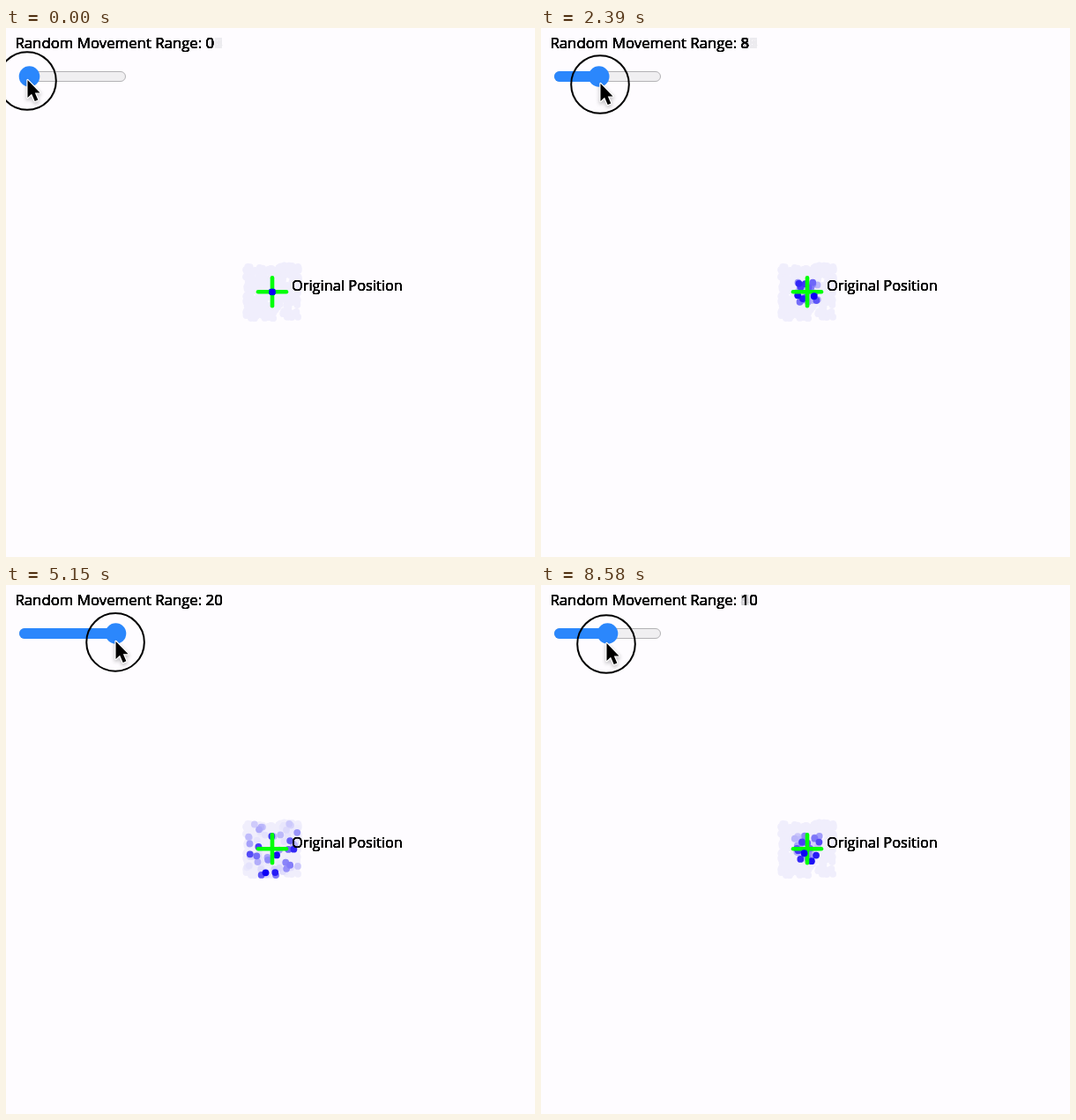
Animation of 600x600 px, one loop 8.61 s. Source, as an HTML page with a canvas:

```html
<!DOCTYPE html>
<html>
<head>
<meta charset="utf-8">
<style>
html, body { margin: 0; width: 100%; height: 100%; overflow: hidden; background: #fefcff; }
canvas { display: block; }
</style>
</head>
<body>
<canvas id="stage" width="600" height="600"></canvas>
<script>
const ctx = document.getElementById('stage').getContext('2d');
const LOOP = 8610, FRAME = 30, STEP = 15, TRAIL = 70, FADE = 0.94;
const CX = 302, CY = 299.3, MAX = 20, UNIT = 1.5;
const STAIN = [240, 238, 252], BLUE = [12, 0, 245];
const TEXT_STAIN = [236, 235, 239], BLACK = [0, 0, 0];

// Pointer stops: time, x, y
const STOPS = [
  [0, 24, 60], [1550, 27, 60], [2000, 67, 64], [2660, 67, 64],
  [3100, 105, 64.5], [3700, 108, 64.5], [3900, 124.3, 64.5], [5550, 124, 65],
  [5910, 58, 68], [6400, 36, 68], [7780, 37, 68], [8130, 74, 67]
];

function pointer(t) {
  const i = STOPS.findIndex(s => s[0] > t);
  if (i < 0) return STOPS[STOPS.length - 1].slice(1);
  if (i === 0) return STOPS[0].slice(1);
  const a = STOPS[i - 1], b = STOPS[i];
  const p = (t - a[0]) / (b[0] - a[0]), ease = p * p * (3 - 2 * p);
  return [1, 2].map(k => a[k] + (b[k] - a[k]) * ease);
}

const thumbX = value => 26.5 + value * 4.9;

function rangeAt(t) {
  const value = Math.round((pointer(t - 25)[0] - thumbX(0)) / 4.9);
  return Math.min(MAX, Math.max(0, value));
}

function random(n) {
  const s = Math.sin(n * 127.1 + 31.7) * 43758.5453;
  return s - Math.floor(s);
}

function mix(a, b, p) {
  return `rgb(${a.map((v, i) => Math.round(v + (b[i] - v) * p))})`;
}

function dot(x, y, r, color) {
  ctx.fillStyle = color;
  ctx.beginPath();
  ctx.arc(x, y, r, 0, 7);
  ctx.fill();
}

function scatter(n, range, color) {
  const offset = k => (random(2 * n + k) * 2 - 1) * range * UNIT;
  dot(CX + offset(0), CY + offset(1), 3.9, color);
}

function line(x1, y1, x2, y2) {
  ctx.beginPath();
  ctx.moveTo(x1, y1);
  ctx.lineTo(x2, y2);
  ctx.stroke();
}

function drawCross() {
  ctx.strokeStyle = '#00ff08';
  ctx.lineWidth = 4.6;
  ctx.lineCap = 'round';
  line(CX - 16, CY, CX + 16, CY);
  line(CX, CY - 16, CX, CY + 16);
}

function drawTrail(t) {
  for (let n = 1; n <= 300; n++) scatter(-n, MAX, mix(STAIN, STAIN, 0));
  for (let k = TRAIL; k >= 0; k--) {
    if (k === 0) drawCross();
    const n = t / STEP - k;
    scatter(n, rangeAt(n * STEP), mix(STAIN, BLUE, FADE ** k));
  }
}

function label(text, x, y, size) {
  ctx.font = `${size}px "Open Sans", "Noto Sans", sans-serif`;
  ctx.fillStyle = '#000';
  for (let i = 0; i < 5; i++) ctx.fillText(text, x, y);
  return x + ctx.measureText(text).width;
}

function drawText(t) {
  label('Original Position', 324, 298, 16.4);
  const y = 23.3, x = label('Random Movement Range: ', 10.4, y, 16.8);
  ctx.fillStyle = mix(TEXT_STAIN, TEXT_STAIN, 0);
  for (let v = 10; v <= MAX; v++) ctx.fillText(v, x, y);
  for (let k = TRAIL; k >= 0; k--) {
    ctx.fillStyle = mix(TEXT_STAIN, BLACK, FADE ** k);
    ctx.fillText(rangeAt(t - k * STEP), x, y);
  }
}

function drawSlider(value) {
  const x = thumbX(value);
  ctx.lineWidth = 1;
  ctx.fillStyle = '#f0eff1';
  ctx.strokeStyle = '#b3b2b5';
  ctx.beginPath();
  ctx.roundRect(15.5, 49.5, 120, 11, 5.5);
  ctx.fill();
  ctx.stroke();
  ctx.fillStyle = '#2b87fc';
  ctx.beginPath();
  ctx.roundRect(15, 49, x - 10, 12, 6);
  ctx.fill();
  dot(x, 55, 11.8, '#2b87fc');
}

function drawPointer([x, y]) {
  ctx.strokeStyle = '#000';
  ctx.lineWidth = 2;
  ctx.beginPath();
  ctx.arc(x, y, 32.8, 0, 7);
  ctx.stroke();

  ctx.save();
  ctx.translate(x + 0.5, y - 1);
  const arrow = new Path2D('M0 0V20L4.6 15.8L8.2 24L11.8 22.4L8.3 14.4H14Z');
  ctx.lineJoin = 'round';
  ctx.strokeStyle = '#fff';
  ctx.lineWidth = 2.4;
  ctx.shadowColor = 'rgba(0,0,0,.3)';
  ctx.shadowBlur = 4;
  ctx.shadowOffsetY = 2;
  ctx.stroke(arrow);
  ctx.shadowColor = 'transparent';
  ctx.fillStyle = '#000';
  ctx.fill(arrow);
  ctx.restore();
}

function draw(time) {
  const t = Math.floor((time % LOOP) / FRAME) * FRAME;
  ctx.fillStyle = '#fefcff';
  ctx.fillRect(0, 0, 600, 600);
  drawTrail(t);
  drawText(t);
  drawSlider(rangeAt(t));
  drawPointer(pointer(t));
}

const start = performance.now();
function tick() {
  draw(performance.now() - start);
  requestAnimationFrame(tick);
}
tick();
</script>
</body>
</html>
```
